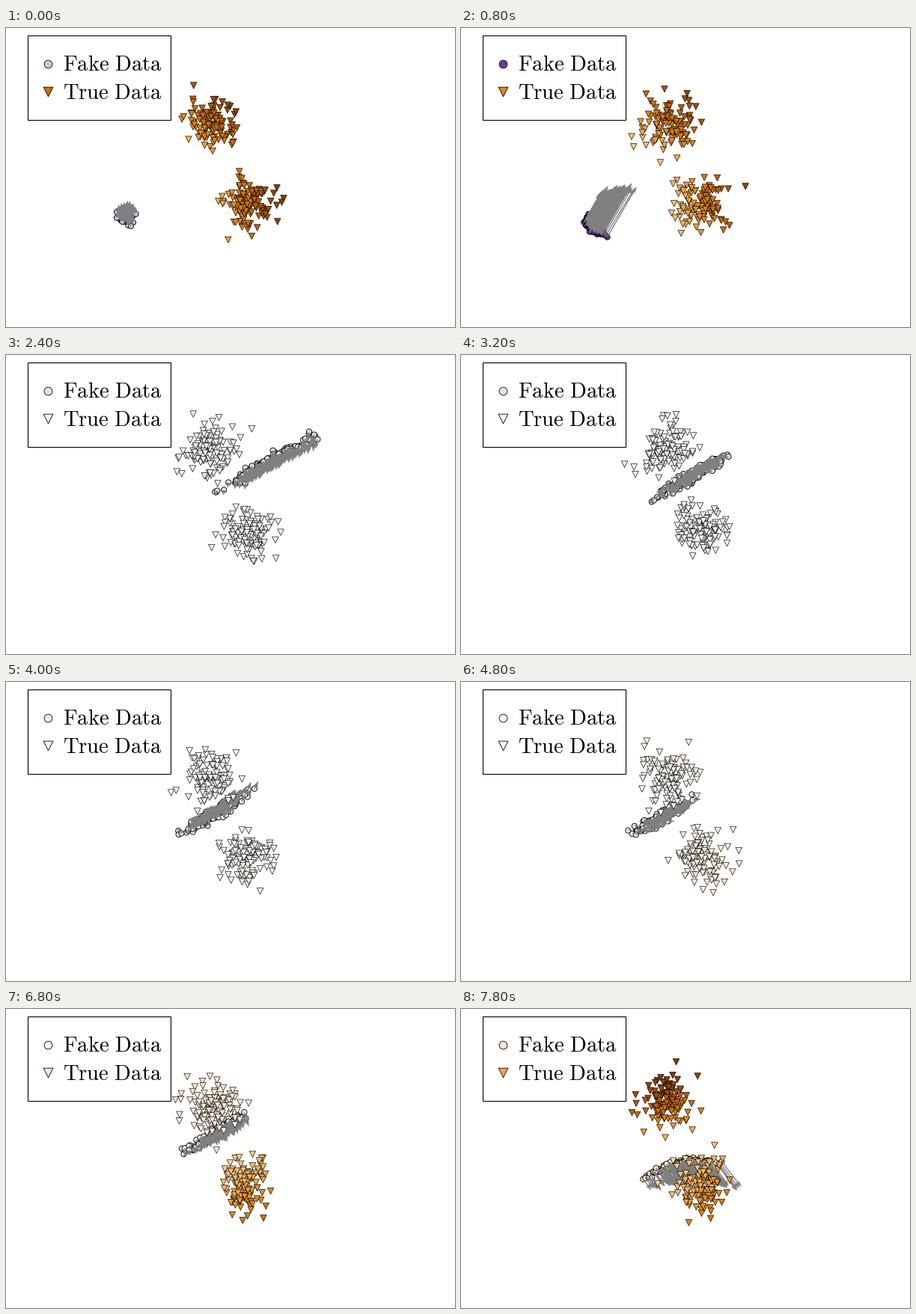
A matplotlib script that plays this animation: 600 px wide and 400 px high, repeating every 8 s.

```python
import numpy as np
import matplotlib.pyplot as plt
from matplotlib.animation import FuncAnimation
from matplotlib.patches import Rectangle

W, H, DPI = 600, 400, 100
FRAMES, STEP = 40, 200
N_FAKE, N_TRUE = 220, 112
CENTERS = np.array([(275, 128), (321, 236)])
SPREAD = 17.5
CMAP = plt.get_cmap("PuOr")
plt.rcParams["mathtext.fontset"] = "cm"


def ease(t, *keys):
    """Glide through (time, value...) keys, slowing down before each one."""
    for (t0, *a), (t1, *b) in zip(keys, keys[1:]):
        if t <= t1:
            f = np.sin(np.pi / 2 * max(0, (t - t0) / (t1 - t0)))
            break
    else:
        f = 1
    v = np.array(a) + f * (np.array(b) - np.array(a))
    return v if len(v) > 1 else v[0]


def unit(degrees):
    a = np.radians(degrees)
    return np.array([np.cos(a), np.sin(a)])


def color(level):
    return CMAP(np.clip(level, 0, 1))


def fake_center(t):
    return ease(t, (0, 160, 250), (1.6, 182, 273), (2.4, 352, 143),
                (4.8, 268, 180), (6.8, 280, 166), (7.8, 293, 207))


def fake_points(t, rng):
    """Noisy cloud along an axis that stretches, turns and bends."""
    s = np.clip(rng.normal(size=N_FAKE), -2.5, 2.5)
    length = ease(t, (0, 2), (1.6, 9), (2.4, 32), (4.8, 20), (7.8, 21))
    axis = unit(ease(t, (0, 30), (1.6, 52), (2.4, -30), (6.8, -31), (7.8, -12)))
    normal = np.array([-axis[1], axis[0]])
    bend = ease(t, (0, 0), (1.6, -1.5), (2.4, 0), (6.8, 0), (7.8, 1.6))
    thick = ease(t, (0, 4.2), (1.6, 1.8), (2.4, 3.6), (6.8, 3.3), (7.8, 2.4))
    line = np.outer(s, length * axis) + np.outer(s ** 2, bend * normal)
    return s, fake_center(t) + line + rng.normal(0, thick, (N_FAKE, 2))


def arrows(t, s, rng):
    size = ease(t, (0, 9), (1.6, 74), (2.4, 11), (4.8, 8), (6.8, 9), (7.8, 31))
    angle = ease(t, (0, -90), (1.6, -47), (3.2, 162), (4.8, 353),
                 (6.8, 426), (7.8, 414))
    return (np.outer(size * (1 + 0.16 * s), unit(angle))
            + rng.normal(0, 0.7, (len(s), 2)))


def fake_level(t):
    return ease(t, (0, .64), (1.6, .96), (2.4, .57), (3.6, .57),
                (4.8, .5), (6.8, .48), (7.8, .44))


def true_levels(t):
    upper = ease(t, (0, .15), (1.6, .2), (2.4, .52), (3.6, .52),
                 (4.8, .485), (6.8, .45), (7.8, .13))
    lower = ease(t, (0, .16), (1.6, .23), (2.4, .52), (3.6, .52),
                 (4.8, .465), (6.8, .27))
    return upper, lower


fig = plt.figure(figsize=(W / DPI, H / DPI), dpi=DPI, facecolor="white")
ax = fig.add_axes([0, 0, 1, 1])


def draw_fake(t, rng, level):
    s, points = fake_points(t, rng)
    x, y = points.T
    u, v = arrows(t, s, rng).T
    ax.scatter(x, y, s=27, marker="o", color=color(np.full(N_FAKE, level)),
               edgecolors="black", linewidths=0.65, zorder=1)
    ax.quiver(x, y, u, v, angles="xy", scale_units="xy", scale=1, units="dots",
              width=1.4, headwidth=4.2, headlength=6.5, headaxislength=5.5,
              color="gray", zorder=2)


def draw_true(t, rng, means):
    for center, mean in zip(CENTERS, means):
        d = rng.normal(0, SPREAD, (N_TRUE, 2))
        # points farther from the fake cloud are judged more surely
        away = center - fake_center(t)
        away = away / np.hypot(*away)
        level = mean - 0.009 * (0.53 - mean) * (d @ away)
        ax.scatter(*(center + d).T, s=38, marker="v", color=color(level),
                   edgecolors="black", linewidths=0.45, zorder=3)


def draw_legend(fake, true):
    ax.add_patch(Rectangle((29.3, 10.2), 191, 113.3, facecolor="white",
                           edgecolor="black", linewidth=0.8, zorder=5))
    rows = [("o", 60, fake, "Fake", 47.6), ("v", 84, true, "True", 85.2)]
    for marker, size, level, word, y in rows:
        ax.scatter([56.2], [y], s=size, marker=marker, color=[color(level)],
                   edgecolors="black", linewidths=0.6, zorder=6)
        ax.text(76.5, y + 9.6, rf"$\mathrm{{{word}\ Data}}$", fontsize=20.65,
                ha="left", va="baseline", color="black", zorder=6)


def draw(i):
    t = i * STEP / 1000
    rng = np.random.default_rng(100 + i)
    ax.clear()
    ax.set_xlim(0, W)
    ax.set_ylim(H, 0)
    ax.axis("off")
    fake, true = fake_level(t), true_levels(t)
    draw_fake(t, rng, fake)
    draw_true(t, rng, true)
    draw_legend(fake, max(true))
    return []


anim = FuncAnimation(fig, draw, frames=FRAMES, interval=STEP,
                     init_func=lambda: [], repeat=True, repeat_delay=0)
plt.show()
```
